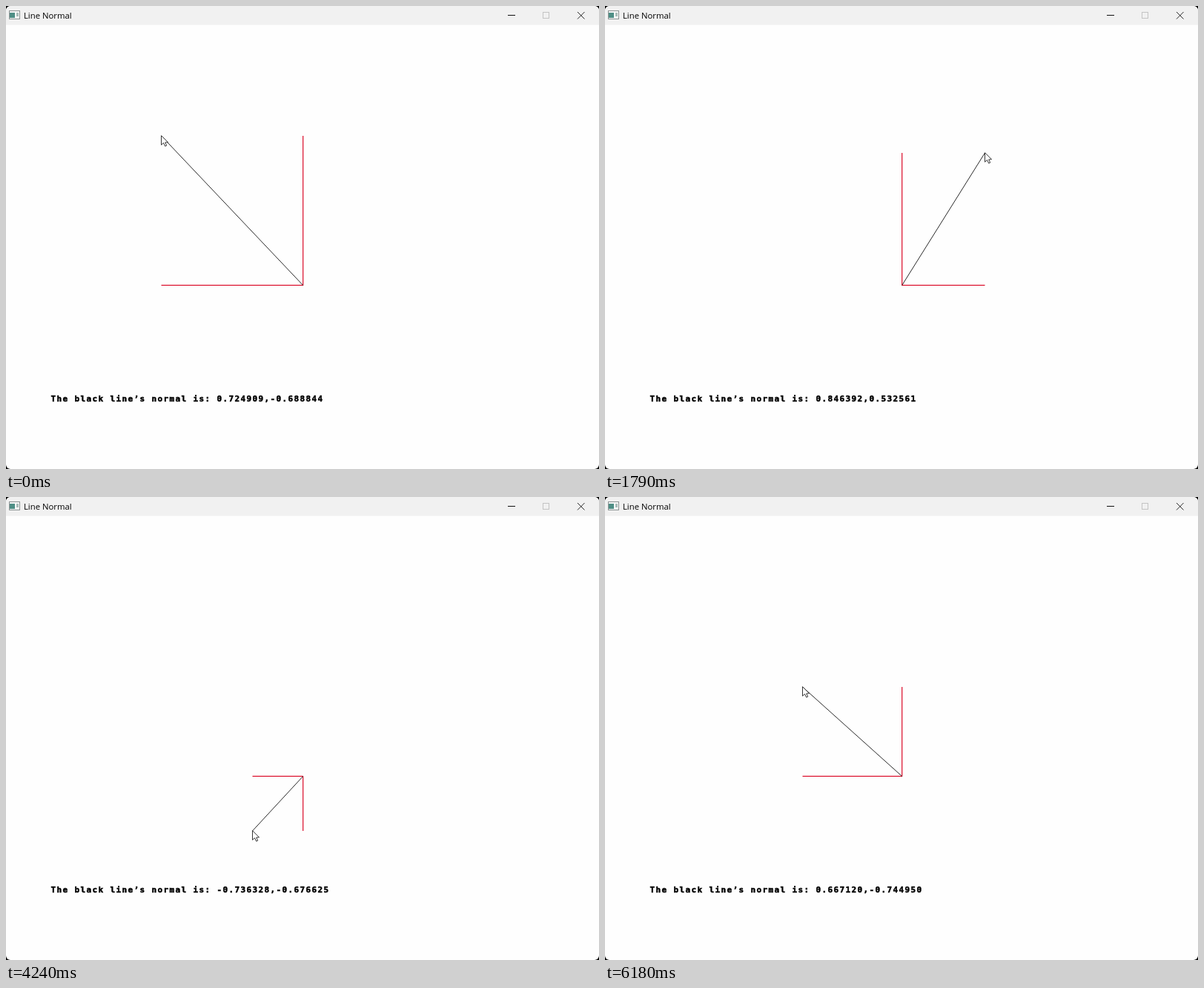
An HTML page with a canvas for the animation above (6.21 s loop, 800 by 624 pixels).

```html
<!DOCTYPE html>
<html lang="en">
<head>
<meta charset="utf-8">
<title>Line Normal</title>
<style>
  html, body { margin: 0; width: 100%; height: 100%; overflow: hidden; background: #000; }
  canvas { display: block; }
</style>
</head>
<body>
<canvas id="stage" width="800" height="624"></canvas>
<script>
const ctx = document.getElementById('stage').getContext('2d');
const LOOP = 6210, STEP = 30;
const CX = 400, CY = 376;
const RED = '#dc1430';

// Key points of the pointer's sweep: time, x, y
const keys = [
  [0, 209, 175], [800, 316, 118], [1300, 478, 140], [1600, 504, 174],
  [2450, 537, 293], [2850, 559, 365], [3270, 511, 447], [3790, 424, 482],
  [4240, 332, 450], [4550, 302, 380], [5000, 358, 283], [5400, 388, 240],
  [6180, 266, 256]
];

function slope(i, axis) {
  const a = keys[Math.max(i - 1, 0)];
  const b = keys[Math.min(i + 1, keys.length - 1)];
  return (b[axis] - a[axis]) / (b[0] - a[0]);
}

// Smooth curve through the keys, advanced in video-sized steps
function pointer(time) {
  const i = keys.findLastIndex(key => key[0] <= time);
  const a = keys[i], b = keys[i + 1];
  if (!b) return a.slice(1);
  const span = b[0] - a[0];
  const u = Math.floor((time - a[0]) / STEP) * STEP / span;
  const v = 1 - u;
  return [1, 2].map(axis => Math.round(
    (1 + 2 * u) * v * v * a[axis] + u * v * v * span * slope(i, axis) +
    u * u * (3 - 2 * u) * b[axis] - u * u * v * span * slope(i + 1, axis)
  ));
}

function line(x1, y1, x2, y2, color, width = 1) {
  ctx.strokeStyle = color;
  ctx.lineWidth = width;
  ctx.beginPath();
  ctx.moveTo(x1, y1);
  ctx.lineTo(x2, y2);
  ctx.stroke();
}

function box(x, y, w, h, color) {
  ctx.fillStyle = color;
  ctx.fillRect(x, y, w, h);
}

function drawWindow() {
  box(0, 0, 800, 624, '#000');
  ctx.save();
  ctx.beginPath();
  ctx.roundRect(0, 0, 800, 624, 6);
  ctx.clip();
  box(0, 0, 800, 624, '#fefefe');
  box(0, 0, 800, 25.5, '#f1f1f1');
  ctx.restore();

  box(4, 6, 15, 12, '#8b9292');
  box(5, 7, 13, 10, '#f5f7f7');
  box(5, 9, 7, 7, '#4f8f86');
  box(14, 9, 3, 5, '#a9bdb9');

  ctx.fillStyle = '#000';
  ctx.font = '11.3px "Open Sans", "Noto Sans", sans-serif';
  ctx.letterSpacing = '0px';
  ctx.fillText('Line Normal', 24, 17);

  line(677, 12.5, 687, 12.5, '#111');
  ctx.strokeStyle = '#c4c4c4';
  ctx.strokeRect(724.5, 8.5, 8, 8);
  line(771, 8, 780.5, 17.5, '#111', 0.9);
  line(780.5, 8, 771, 17.5, '#111', 0.9);
}

function drawLabel(text) {
  ctx.font = 'bold 11px "DejaVu Sans Mono", "Liberation Mono", monospace';
  ctx.letterSpacing = '0px';
  ctx.letterSpacing = (8 - ctx.measureText('0').width) + 'px';
  ctx.fillStyle = ctx.strokeStyle = '#000';
  ctx.lineWidth = 0.5;
  ctx.fillText(text, 60.5, 533);
  ctx.strokeText(text, 60.5, 533);
}

function drawCursor(x, y) {
  const outline = [[0, 0], [0, 12.5], [3, 9.8], [5.2, 14.3], [7.2, 13.4], [5.2, 9.2], [9, 9]];
  ctx.beginPath();
  for (const [dx, dy] of outline) ctx.lineTo(x + dx, y + dy);
  ctx.closePath();
  ctx.fillStyle = '#fff';
  ctx.fill();
  ctx.strokeStyle = '#222';
  ctx.lineWidth = 0.9;
  ctx.stroke();
}

function draw(time) {
  const [x, y] = pointer(time);
  const dx = x - CX, dy = y - CY;
  const len = Math.hypot(dx, dy) || 1;
  const ox = CX + 0.7, oy = CY + 0.4;

  drawWindow();
  line(ox, oy, x + 0.5, oy, RED, 1.25);
  line(ox, oy, ox, y, RED, 1.25);
  line(ox, oy, x + 0.5, y, '#111', 0.9);
  drawLabel(`The black line’s normal is: ${(-dy / len).toFixed(6)},${(dx / len).toFixed(6)}`);
  drawCursor(x + 0.5, y - 0.3);
}

const start = performance.now();
function tick() {
  draw((performance.now() - start) % LOOP);
  requestAnimationFrame(tick);
}
tick();
</script>
</body>
</html>
```
